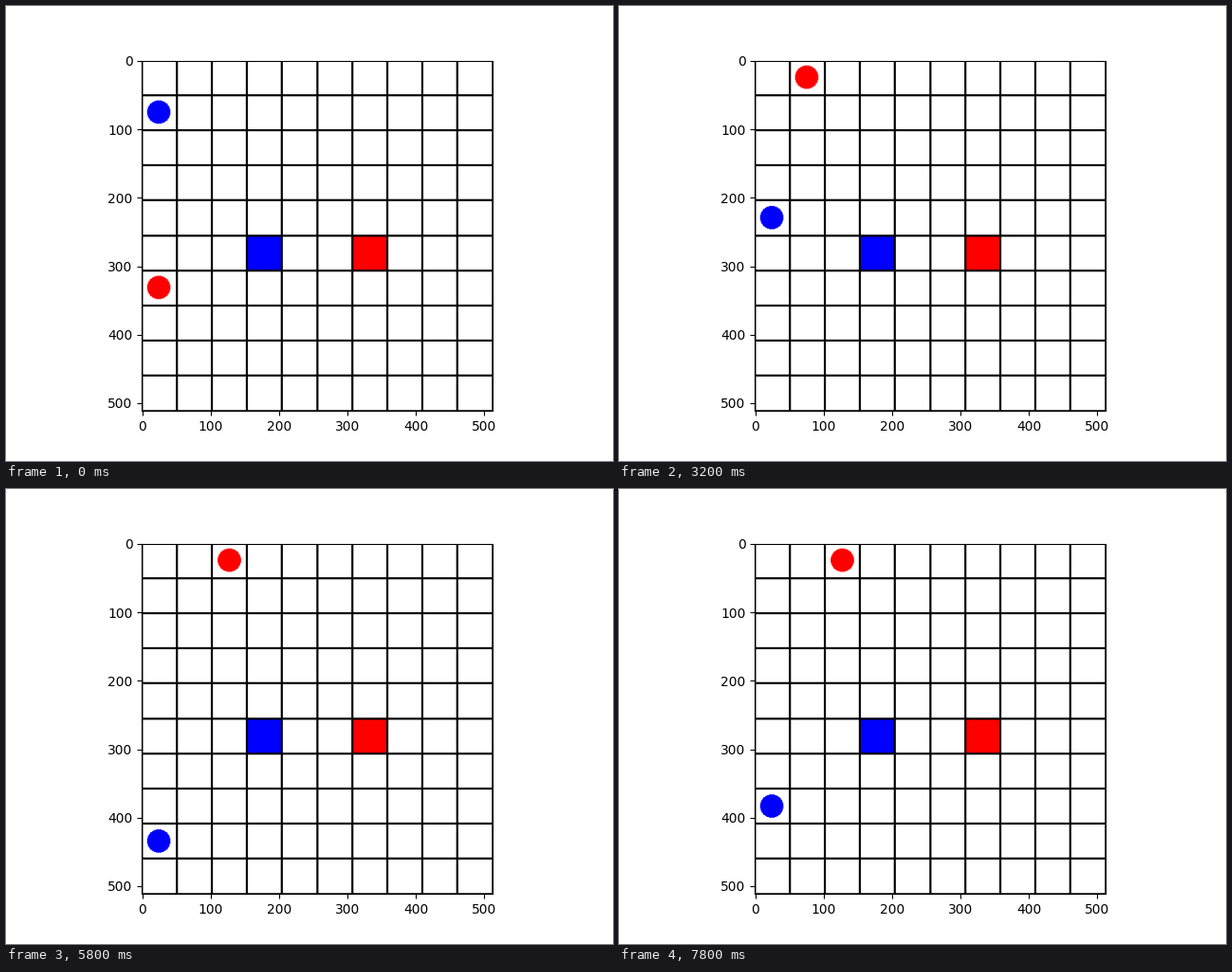
Write a matplotlib script that moves like this. It is 640 px wide and 480 px high and loops after 8000 ms.

```python
import numpy as np
import matplotlib.pyplot as plt
from matplotlib.animation import FuncAnimation

SIZE, CELLS = 512, 10
CELL = SIZE / CELLS
RED, BLUE = (255, 0, 0), (0, 0, 255)
STEP = {"U": (0, -1), "D": (0, 1), "L": (-1, 0), "R": (1, 0), ".": (0, 0)}


def walk(start, moves):
    """Cell (column, row) of an agent before and after every move."""
    return np.cumsum([start] + [STEP[m] for m in moves], axis=0)


red_path = walk((0, 6), "UUUUUU" "D..R....." "URD..U" + "." * 10 + "DU....DU")
blue_path = walk((0, 1), "..D...DDU" ".D.U..DU.." "D..DDDDU.D" "DU..UDUD.U")

ys, xs = np.mgrid[:SIZE, :SIZE] + 0.5


def draw_square(canvas, cell, color):
    x, y = (int(c * CELL) for c in cell)
    canvas[y:y + int(CELL), x:x + int(CELL)] = color


def draw_agent(canvas, cell, color):
    x, y = (int((c + 0.5) * CELL) for c in cell)
    canvas[np.hypot(xs - x, ys - y) < int(CELL / 3)] = color


def make_board():
    canvas = np.full((SIZE, SIZE, 3), 255, dtype=np.uint8)
    draw_square(canvas, (3, 5), BLUE)
    draw_square(canvas, (6, 5), RED)
    for i in range(CELLS + 1):
        p = int(i * CELL)
        line = slice(max(p - 1, 0), p + 2)
        canvas[line] = 0
        canvas[:, line] = 0
    return canvas


board = make_board()


def render(i):
    canvas = board.copy()
    draw_agent(canvas, red_path[i], RED)
    draw_agent(canvas, blue_path[i], BLUE)
    return canvas


fig, ax = plt.subplots(figsize=(6.4, 4.8), dpi=100)
image = ax.imshow(render(0))


def update(i):
    image.set_data(render(i))
    return (image,)


anim = FuncAnimation(fig, update, frames=len(red_path), interval=200,
                     repeat=True, repeat_delay=0, blit=False)
plt.show()
```
